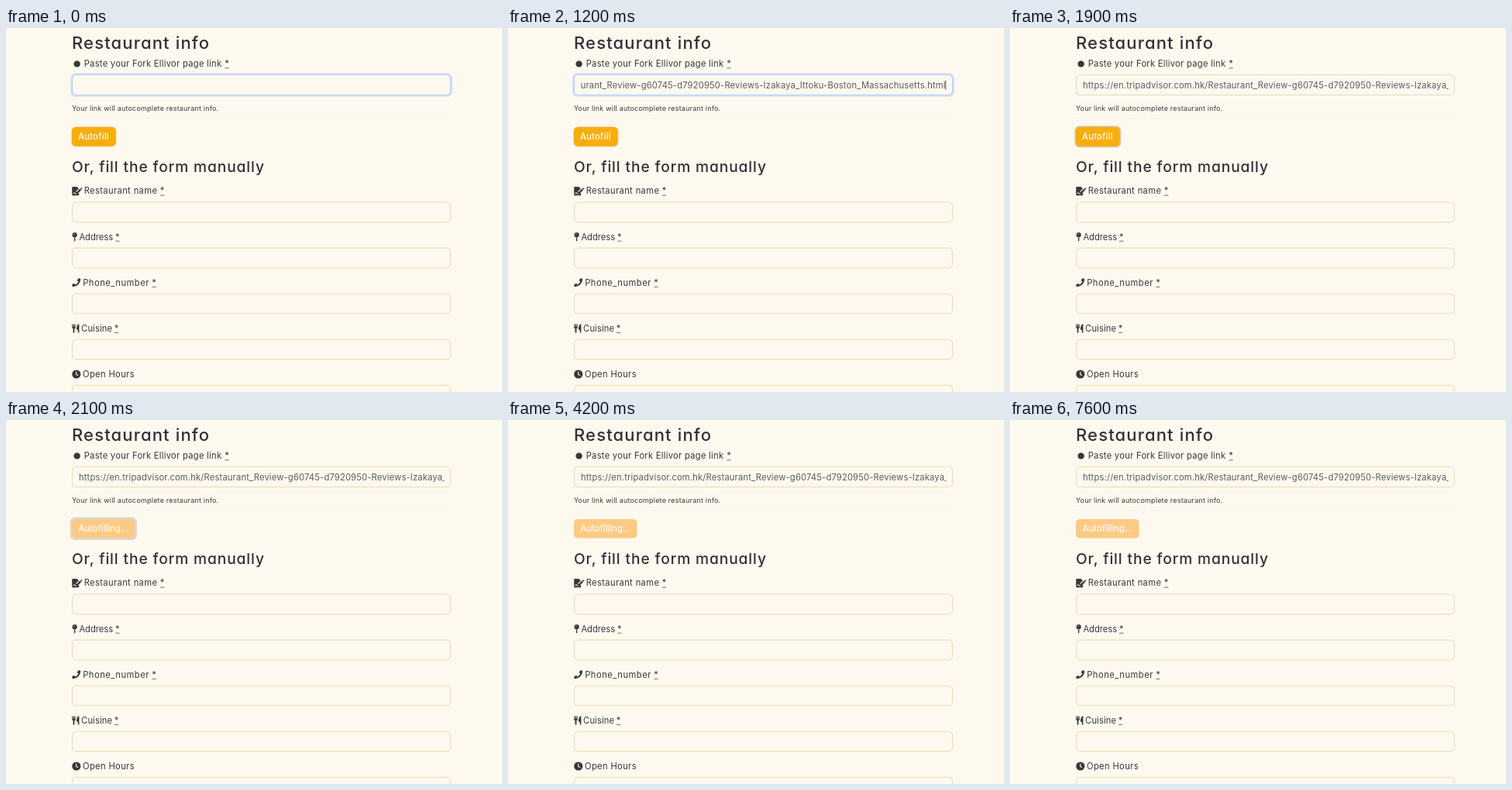
An HTML page that plays this animation: 640 px wide and 470 px high, repeating every 8000 ms.

```html
<!DOCTYPE html>
<html lang="en">
<head>
<meta charset="utf-8">
<title>Restaurant form</title>
<style>
  html, body { margin: 0; width: 100%; height: 100%; overflow: hidden; background: #fef9ef; }
  svg { display: block; width: 640px; height: 470px; font: 11.2px Inter, "DejaVu Sans", sans-serif; fill: #38383b; }
  .title { font-weight: 500; font-feature-settings: "cv11"; fill: #303036; }
  .field { fill: #fef9ef; stroke: #eadfb2; stroke-width: 1.1; }
  .url { fill: #5c5c5f; letter-spacing: .17px; }
  .cut { fill: none; stroke: #fef9ef; }
  #label { fill: #fffaf0; font-weight: 500; }
</style>
</head>
<body>
<svg viewBox="0 0 640 470">
  <defs>
    <clipPath id="inside"><rect x="93.5" y="62" width="472" height="23"/></clipPath>
    <g id="sign">
      <path d="M1 0H6.2L9 2.8V10.2Q9 11.2 8 11.2H1Q0 11.2 0 10.2V1Q0 0 1 0Z"/>
      <path class="cut" stroke-width="4" d="M6.3 7.4L11.4 2.6"/>
      <path class="cut" stroke-width=".9" d="M1.4 9.2L2.8 7.2L3.8 9L6 9"/>
      <path d="M5.4 8.9L5.7 6.9L10.2 2.5L12 4.2L7.4 8.6ZM10.8 2L11.5 1.4Q12 1 12.5 1.5L13 2Q13.4 2.5 13 3L12.4 3.7Z"/>
    </g>
    <g id="pin">
      <circle cx="3.4" cy="3.1" r="3.1"/>
      <path d="M2.7 6.4H4.1V10.2L3.4 11.3L2.7 10.2Z"/>
      <path class="cut" stroke-width=".6" d="M1.8 3Q1.9 1.6 3.3 1.5"/>
    </g>
    <path id="phone" d="M10.6 .5L8.4 0Q8 0 7.8 .3L6.7 2.7Q6.6 3.1 6.9 3.3L8.2 4.4Q6.9 7 4.4 8.2L3.3 6.9Q3.1 6.6 2.7 6.7L.3 7.8Q0 8 0 8.4L.5 10.6Q.6 11 1 11A10 10 0 0 0 11 1Q11 .6 10.6 .5Z"/>
    <g id="fork">
      <path d="M0 .2H1V3.4H1.7V0H2.9V3.4H3.6V.2H4.6V4Q4.6 5.4 3.2 6V10.6Q3.2 11.2 2.3 11.2T1.4 10.6V6Q0 5.4 0 4Z"/>
      <path d="M9.2 .5V10.6Q9.2 11.2 8.4 11.2T7.6 10.6V7.4H6.3Q5.6 7.4 5.7 6.5Q6 1.2 8.6 0Q9.2 0 9.2 .5Z"/>
    </g>
    <g id="clock">
      <circle cx="5.6" cy="5.6" r="5.6"/>
      <path class="cut" stroke-width="1.1" d="M5.5 2.3V5.8L7.7 7.4"/>
    </g>
  </defs>

  <text class="title" x="85" y="26.6" font-size="22" letter-spacing="1.15">Restaurant info</text>
  <circle cx="91.6" cy="46.4" r="4.2"/>

  <rect id="ring" x="82.9" y="58" width="493.2" height="31" rx="7" fill="#d7e4f5"/>
  <rect id="link" class="field" x="85.5" y="60.5" width="488" height="26" rx="5"/>
  <g clip-path="url(#inside)">
    <text id="url" class="url" y="77.6"></text>
    <rect id="caret" x="564.4" y="67.5" width="1" height="12.5"/>
  </g>
  <text x="85" y="107.4" font-size="8.96" letter-spacing=".22">Your link will autocomplete restaurant info.</text>
  <rect x="85" y="116" width="489" height="1" fill="#f6efdc"/>

  <rect id="halo" rx="6.5"/>
  <rect id="button" x="85" y="128" height="24.6" rx="5"/>
  <text id="label" y="143.7"></text>

  <text class="title" x="85" y="186.4" font-size="19.2" letter-spacing=".88">Or, fill the form manually</text>
  <g id="form"></g>
</svg>
<script>
const $ = id => document.getElementById(id);
const set = (id, attrs) => {
  for (const k in attrs) $(id).setAttribute(k, attrs[k]);
};

const URL_TEXT = "https://en.tripadvisor.com.hk/Restaurant_Review-g60745-d7920950-Reviews-Izakaya_Ittoku-Boston_Massachusetts.html";

// icon, text, text x, letter spacing, x of the required mark
const rows = [
  ["sign", "Restaurant name", 100.7, .36, 201.6],
  ["pin", "Address", 94.4, 0, 143.8],
  ["phone", "Phone_number", 99.2, .5, 191],
  ["fork", "Cuisine", 97.1, .12, 142.6],
  ["clock", "Open Hours", 99, .35]
];

const caption = (text, x, y, gap, star) =>
  `<text x="${x}" y="${y}" letter-spacing="${gap}">${text}</text>` + (star ?
  `<text x="${star}" y="${y}" text-anchor="middle">*</text>
   <rect x="${star - 2.6}" y="${y + 1.2}" width="5.2" height=".9" opacity=".8"/>` : "");

$("form").innerHTML = caption("Paste your Fork Ellivor page link", 100.7, 50.2, .27, 285) +
  rows.map(([icon, text, x, gap, star], i) => {
    const y = 59.1 * i;
    return `<use href="#${icon}" x="85.2" y="${205 + y}"/>` +
      caption(text, x, 214.4 + y, gap, star) +
      `<rect class="field" x="85.5" y="${225 + y}" width="488" height="25.6" rx="5"/>`;
  }).join("");

const LOOP = 8000, PASTE = 100, BLUR = 1800, PRESS = 1900, SEND = 2000, DONE = 2200;

function draw(t) {
  const focused = t < BLUR;
  $("url").textContent = t < PASTE ? "" : URL_TEXT;
  set("url", focused ? { x: 564.6, "text-anchor": "end" } : { x: 94, "text-anchor": "start" });
  set("caret", { opacity: focused && t >= PASTE && (t - PASTE) % 1100 < 550 ? 1 : 0 });
  set("ring", { opacity: focused ? 1 : t < PRESS ? .7 : 0 });
  $("link").style.stroke = t < PRESS ? "#b5ccf1" : t < SEND ? "#e2dcc0" : "#eadfb2";

  const sending = t >= SEND;
  const width = sending ? 81.5 : 56.6;
  $("label").textContent = sending ? "Autofilling..." : "Autofill";
  set("label", { x: sending ? 93.6 : 93, "letter-spacing": sending ? 0 : .25 });
  set("button", { width, fill: sending ? "#fdca84" : "#f9ad0b" });

  const [edge, fill] = t < PRESS ? [.8, "#e6cd97"]
    : t < SEND ? [1.7, "#d8c8a2"]
    : t < DONE ? [2.4, "#d9d9da"] : [0, "none"];
  set("halo", { x: 85 - edge, y: 128 - edge, width: width + 2 * edge, height: 24.6 + 2 * edge, fill });
}

const start = performance.now();
function tick() {
  draw((performance.now() - start) % LOOP);
  requestAnimationFrame(tick);
}
tick();
</script>
</body>
</html>
```
